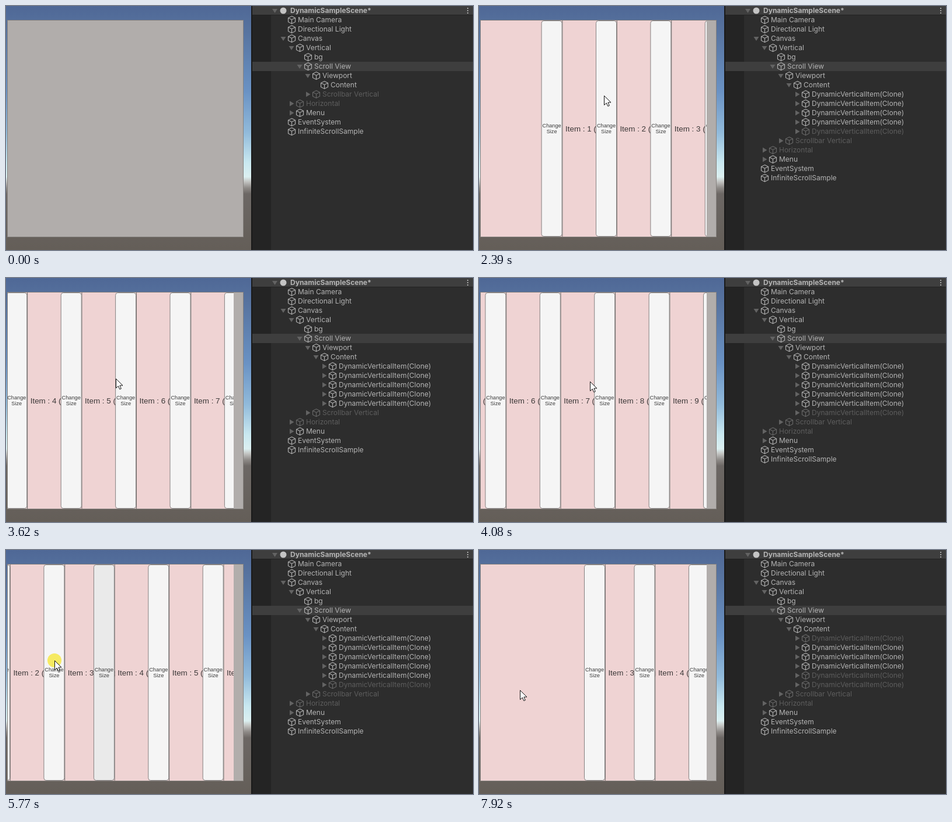
Animation, 800 px wide and 420 px high, one loop 8 s. Source, as an HTML page with a canvas:

```html
<!DOCTYPE html>
<html>
<head>
<meta charset="utf-8">
<style>
html, body { margin: 0; width: 100%; height: 100%; overflow: hidden; background: #2d2d2d; }
canvas { display: block; }
</style>
</head>
<body>
<canvas id="stage" width="800" height="420"></canvas>
<script>
const ctx = document.getElementById('stage').getContext('2d');
const LOOP = 8000, LEFT = 2.5, ITEM_W = 93.4, POOL = 5, TREE_LAG = 200;

// [time, item, new width]
const clicks = [[1500, 0, 312], [4480, 6, 297], [5520, 3, 85.5], [5800, 2, 312]];
const drags = [[1860, 2300], [4900, 5340], [6080, 6480], [7060, 7300], [7500, 7850]];
// [time, scroll offset]
const scrollKeys = [[0, 0], [1860, 0], [2390, 171], [3000, 400], [3620, 557.5], [4100, 735],
  [4930, 735], [5350, 416], [5480, 400], [6080, 400], [6480, -30], [6770, -1], [6850, 0],
  [7060, 0], [7300, 230], [7500, 230], [7920, 503], [8000, 515]];
// [time, x, y]
const cursorKeys = [[1010, 140, 215], [1240, 103, 148], [1450, 85, 150], [1560, 85, 150],
  [1860, 300, 152], [2390, 214, 154], [3000, 240, 165], [3620, 188, 173], [4100, 190, 178],
  [4400, 130, 180], [4600, 130, 180], [4860, 81, 174], [4930, 81, 174], [5350, 400, 180],
  [5480, 175, 190], [5560, 175, 190], [5740, 83, 190], [5850, 83, 190], [6080, 200, 200],
  [6480, 720, 230], [6930, 720, 230], [7060, 330, 238], [7300, 100, 240], [7500, 330, 240],
  [7880, 70, 241], [8000, 70, 241]];

function sample(keys, t, col = 1) {
  const i = keys.findIndex(k => k[0] > t);
  if (i < 0) return keys[keys.length - 1][col];
  if (i === 0) return keys[0][col];
  const a = keys[i - 1], b = keys[i], u = (t - a[0]) / (b[0] - a[0]);
  return a[col] + (b[col] - a[col]) * u * u * (3 - 2 * u);
}

const spawned = t => t < 80 ? 0 : Math.min(POOL, Math.floor((t - 80) / 156) + 1);

function visibleItems(t) {
  const count = t < 1000 ? spawned(t) : 20, items = [];
  let x = LEFT - sample(scrollKeys, t);
  for (let i = 0; i < count && x < 390; i++) {
    let w = ITEM_W;
    for (const c of clicks) if (c[1] === i && t >= c[0]) w = c[2];
    if (x + w > 3) items.push({ i, x, w });
    x += w;
  }
  return items;
}

function rect(x, y, w, h, color) {
  ctx.fillStyle = color;
  ctx.fillRect(x, y, w, h);
}

function label(text, x, y, font, color, align = 'left') {
  ctx.font = font;
  ctx.fillStyle = color;
  ctx.textAlign = align;
  ctx.fillText(text, x, y);
}

function path(points, close) {
  ctx.beginPath();
  points.forEach(([x, y]) => ctx.lineTo(x, y));
  if (close) ctx.closePath();
}

function disc(x, y, r, color) {
  ctx.fillStyle = color;
  ctx.beginPath();
  ctx.arc(x, y, r, 0, 7);
  ctx.fill();
}

function drawBackdrop() {
  const sky = ctx.createLinearGradient(0, 0, 0, 420);
  [[0, '#4f6896'], [.1, '#57739f'], [.35, '#6a92c4'], [.52, '#92bbdb'], [.64, '#c9e8f0'],
    [.7, '#dcf0f1'], [.72, '#c3c4c2'], [.745, '#8f8b88'], [.77, '#6c6764'], [1, '#645e58']]
    .forEach(([p, c]) => sky.addColorStop(p, c));
  rect(0, 0, 420, 420, sky);
  rect(2, 24, 405, 374, '#86827f');
  rect(3, 25, 403, 372, '#b1adab');
}

function drawItem({ i, x, w }, t) {
  const right = x + w, pressed = clicks.some(c => c[1] === i && t >= c[0] && t < c[0] + 600);
  ctx.save();
  ctx.beginPath();
  ctx.rect(x, 25, w, 372);
  ctx.clip();
  rect(x, 25, w, 372, '#efd3d3');
  label(`Item : ${i} (${i % 2 ? 'Odd' : 'Even'})`, x + 4.5, 216, '13.4px "Liberation Sans", sans-serif', '#3c3838');
  rect(right - 1.2, 25, 1.2, 372, '#777170');
  ctx.beginPath();
  ctx.roundRect(right - 36.4, 25.5, 35, 371, 4);
  ctx.fillStyle = pressed ? '#eaeaea' : '#f5f5f5';
  ctx.fill();
  ctx.strokeStyle = '#858181';
  ctx.lineWidth = 1;
  ctx.stroke();
  const font = '9.2px "Liberation Sans", sans-serif';
  label('Change', right - 18.9, 209, font, '#3c3c3c', 'center');
  label('Size', right - 18.9, 219, font, '#3c3c3c', 'center');
  ctx.restore();
}

function drawScroller(t) {
  ctx.save();
  ctx.beginPath();
  ctx.rect(3, 25, 387, 372);
  ctx.clip();
  visibleItems(t).forEach(item => drawItem(item, t));
  ctx.restore();
}

function drawArrow(x, y, open) {
  path(open ? [[x - 4.5, y - 3], [x + 4.5, y - 3], [x, y + 4]]
            : [[x - 3, y - 4.5], [x + 4.5, y], [x - 3, y + 4.5]], true);
  ctx.fillStyle = '#636363';
  ctx.fill();
}

function drawCube(x, y, color) {
  ctx.strokeStyle = color;
  ctx.lineWidth = 1.1;
  path([[x, y - 6.5], [x + 6, y - 3.5], [x + 6, y + 3.5], [x, y + 6.5], [x - 6, y + 3.5], [x - 6, y - 3.5]], true);
  ctx.stroke();
  path([[x - 6, y - 3.5], [x, y - .5], [x + 6, y - 3.5]]);
  ctx.stroke();
  path([[x, y - .5], [x, y + 6.5]]);
  ctx.stroke();
}

// Rows are [name, depth, arrow, dim]; arrow is 'open', 'shut' or empty.
function treeRows(t) {
  const count = t > 4000 ? POOL + 1 : spawned(t);
  const active = visibleItems(Math.max(0, t - TREE_LAG)).map(item => item.i % POOL);
  const clones = Array.from({ length: count }, (_, k) =>
    ['DynamicVerticalItem(Clone)', 5, 'shut', t > 1000 && !active.includes(k)]);
  return [
    ['Main Camera', 0], ['Directional Light', 0], ['Canvas', 0, 'open'], ['Vertical', 1, 'open'],
    ['bg', 2], ['Scroll View', 2, 'open'], ['Viewport', 3, 'open'], ['Content', 4, count ? 'open' : ''],
    ...clones,
    ['Scrollbar Vertical', 3, 'shut', true], ['Horizontal', 1, 'shut', true], ['Menu', 1, 'shut'],
    ['EventSystem', 0], ['InfiniteScrollSample', 0]
  ];
}

function drawTree(t) {
  rect(420, 0, 2, 420, '#191919');
  rect(422, 0, 378, 420, '#2d2d2d');
  rect(422, 0, 32, 420, '#242424');
  rect(422, 0, 378, 15, '#3e3e3e');
  rect(422, 15, 378, 1, '#222');
  rect(422, 96, 378, 16, '#3e3e3e');
  drawArrow(460.5, 8, true);
  disc(475, 8, 5.5, '#c4c4c4');
  label('DynamicSampleScene*', 487, 12, 'bold 12px Inter, sans-serif', '#b4b4b4');
  for (const y of [4, 8, 12]) disc(791, y, 1.1, '#c0c0c0');
  treeRows(t).forEach(([name, depth, arrow, dim], r) => {
    const x = 475 + depth * 14, y = 24 + r * 16;
    if (arrow) drawArrow(x, y, arrow === 'open');
    drawCube(x + 14.5, y, dim ? '#6a6a6a' : '#b4b4b4');
    label(name, x + 25, y + 4.3, '12px Inter, sans-serif', dim ? '#5e5e5e' : '#b4b4b4');
  });
}

function drawCursor(t) {
  if (t < 1010 || (t > 6690 && t < 6890)) return;
  const x = sample(cursorKeys, t), y = sample(cursorKeys, t, 2);
  const down = drags.some(([a, b]) => t >= a && t < b) || clicks.some(([c]) => Math.abs(t - c) < 45);
  if (down) disc(x, y, 12, 'rgba(246,232,72,.85)');
  path([[0, 0], [0, 16], [3.8, 12.5], [6.3, 18], [8.8, 17], [6.4, 11.5], [11.5, 11.5]]
    .map(([dx, dy]) => [x + dx + .5, y + dy + .5]), true);
  ctx.fillStyle = '#fff';
  ctx.fill();
  ctx.strokeStyle = '#111';
  ctx.lineWidth = 1;
  ctx.stroke();
}

const start = performance.now();
function frame() {
  const t = (performance.now() - start) % LOOP;
  drawBackdrop();
  drawScroller(t);
  drawTree(t);
  drawCursor(t);
  requestAnimationFrame(frame);
}
frame();
</script>
</body>
</html>
```
